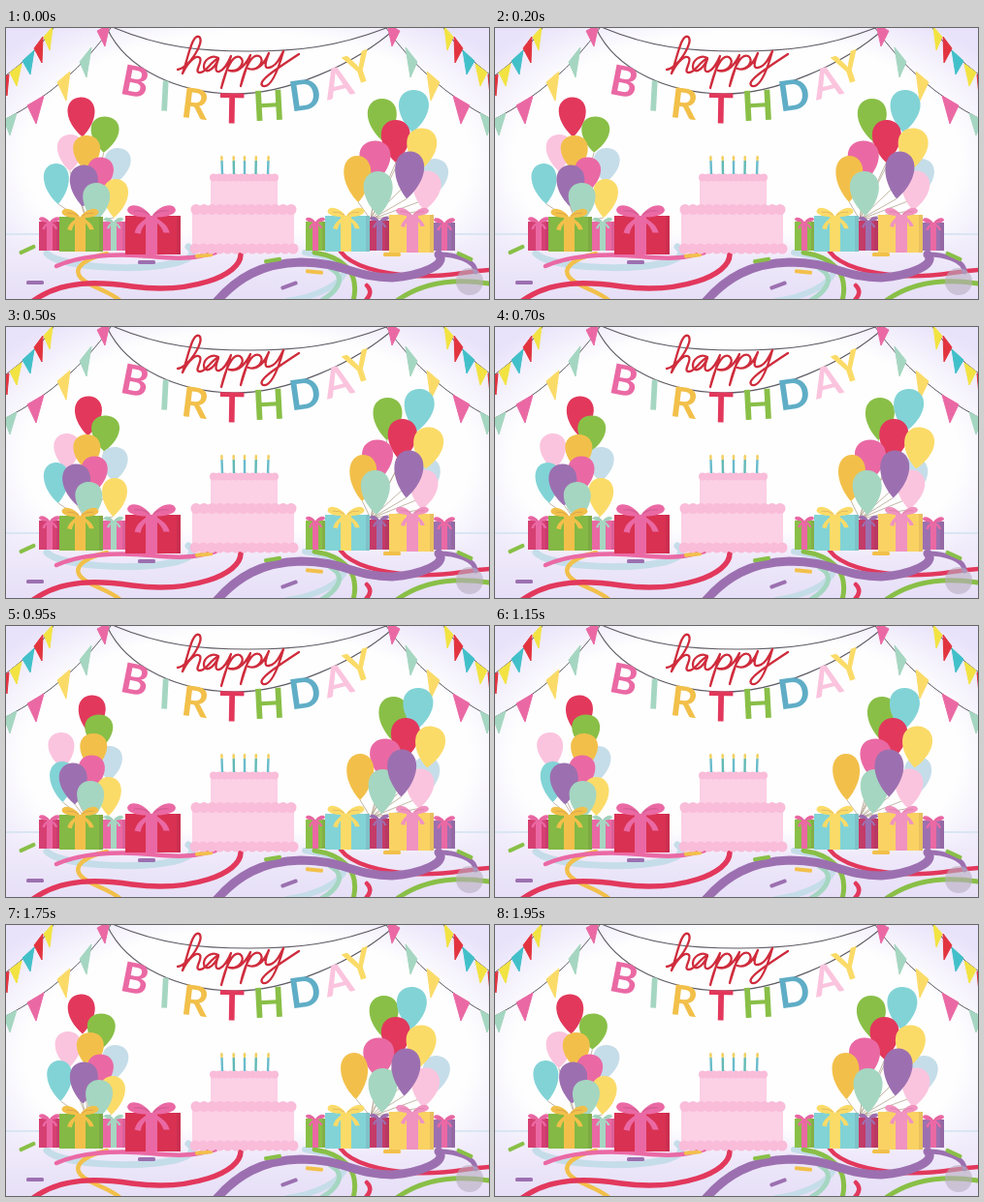
Write an HTML page that moves like this. It is 498 px wide and 280 px high and loops after 2000 ms.

```html
<!DOCTYPE html>
<html lang="en">
<head>
<meta charset="utf-8">
<title>Happy birthday</title>
<style>
  html, body { margin: 0; width: 100%; height: 100%; overflow: hidden; background: #fff; }
  svg { display: block; width: 498px; height: 280px; }
  .line { fill: none; stroke-linecap: round; stroke-linejoin: round; }
  .letters { font: 700 43px Lato, "Open Sans", sans-serif; text-anchor: middle; }
</style>
</head>
<body>
<svg viewBox="0 0 498 280">
  <defs>
    <radialGradient id="wall" cx="50%" cy="48%" r="64%">
      <stop offset=".72" stop-color="#fefefe"/>
      <stop offset="1" stop-color="#e8e2fa"/>
    </radialGradient>
    <linearGradient id="floor" x2="0" y2="1">
      <stop offset="0" stop-color="#f4f1fc" stop-opacity="0"/>
      <stop offset=".4" stop-color="#efe9fa"/>
      <stop offset="1" stop-color="#e6dff7"/>
    </linearGradient>
  </defs>
  <rect width="498" height="280" fill="url(#wall)"/>
  <rect y="208" width="498" height="72" fill="url(#floor)"/>
  <path d="M0,213H34M463,213H498" class="line" stroke="#d9e6f2" stroke-width="2"/>
  <g class="line" stroke="#5d5a63" stroke-width="1.1">
    <path d="M112,0C160,20 200,24 250,24S340,20 392,0"/>
    <path d="M104,0C125,45 180,67 234,68S360,38 402,0"/>
  </g>
  <g id="bunting"></g>
  <g id="bunting2" transform="translate(500) scale(-1 1)"></g>
  <g id="letters" class="letters"></g>
  <path class="line" stroke="#cf2c3c" stroke-width="2.3" aria-label="happy"
    d="M177,43C188,42 206,14 199,9C192,6 188,30 182,47C188,34 197,27 200,31C203,35 193,46 200,46
       C206,46 210,36 219,31C212,27 204,33 204,40C204,47 213,46 219,32C216,40 215,46 220,45
       C225,43 229,36 232,29L222,62C226,45 233,27 241,30C248,34 241,46 230,44
       C240,47 247,38 252,28L242,60C246,42 253,26 261,29C268,33 260,45 250,42
       C260,45 266,37 271,26C267,36 266,42 271,41C278,40 282,32 286,24
       C281,42 274,62 265,60C258,56 276,44 302,27"/>
  <g id="streamers" class="line"></g>
  <g id="confetti"></g>
  <g id="strings" stroke="#b3a48f" stroke-width=".8"></g>
  <g id="balloons"></g>
  <g id="gifts"></g>
  <g id="cake"></g>
  <circle cx="478" cy="262" r="14" fill="#b7aebf" opacity=".6"/>
</svg>
<script>
const C = {
  red: '#e2385c', green: '#89bf47', blush: '#fbc4de', gold: '#f2c04a', sky: '#c5dde9',
  pink: '#ea69a4', lemon: '#fbdb68', cyan: '#82d3d6', purple: '#9c70b0', mint: '#a5d6c1',
  scarlet: '#e2343f', yellow: '#f2e342', teal: '#42c0c9'
};
const put = (id, html) => document.getElementById(id).innerHTML += html;

// Flags: colour, two corners on the cord, tip
const flags = [
  ['scarlet', '-4,52 3,48 1,70'], ['yellow', '4,46 16,37 11,60'], ['teal', '17,34 29,23 25,48'],
  ['scarlet', '29,21 38,9 37,36'], ['yellow', '39,9 48,-1 45,23'],
  ['mint', '-2,95 11,88 4,111'], ['pink', '22,80 39,70 31,99'], ['lemon', '53,56 66,45 62,75'],
  ['mint', '76,35 88,20 83,51'], ['pink', '94,3 107,-4 102,19']
];
const bunting = '<g class="line" stroke="#5d5a63"><path d="M0,49Q30,27 49,0M0,94Q66,60 108,0"/></g>' +
  flags.map(([c, p]) => `<polygon points="${p}" fill="${C[c]}" stroke="${C[c]}"/>`).join('');
put('bunting', bunting);
put('bunting2', bunting);

// Letters: glyph, centre, angle, colour
[['B', 133, 55, 11, 'pink'], ['I', 164, 70, 3, 'mint'], ['R', 195, 78, 7, 'gold'],
 ['T', 233, 83, 1, 'red'], ['H', 271, 80, -3, 'green'], ['D', 308, 69, -8, '#5fadc6'],
 ['A', 342, 56, -14, 'blush'], ['Y', 364, 41, -18, 'lemon']
].forEach(([ch, x, y, a, c]) => put('letters',
  `<text transform="translate(${x} ${y}) rotate(${a})" y="15.5" fill="${C[c] || c}">${ch}</text>`));

// Floor streamers: colour, width, path
[['sky', 7, 'M42,233C56,247 130,252 174,243C192,239 196,232 188,226'],
 ['gold', 4.5, 'M104,233C82,238 68,248 77,258C86,268 106,271 118,282'],
 ['pink', 4.5, 'M52,246C74,236 110,232 150,236S200,236 216,232'],
 ['red', 5.5, 'M28,282C58,260 96,262 130,267C190,275 242,256 242,234'],
 ['sky', 6, 'M290,282C318,278 346,266 350,250C350,240 330,236 308,232'],
 ['green', 5, 'M318,232C344,236 366,250 358,282'],
 ['mint', 5, 'M325,282C345,270 350,256 334,248'],
 ['red', 4.5, 'M345,231C356,246 386,254 420,256S470,252 498,250'],
 ['green', 5, 'M404,281C428,264 460,258 498,264'],
 ['purple', 9, 'M216,284C238,258 264,243 304,242C348,242 360,258 398,258C428,256 456,244 446,234'],
 ['purple', 5, 'M446,234C464,234 484,240 484,252'],
 ['red', 4.5, 'M368,284C378,276 376,270 372,266']
].forEach(([c, w, d]) => put('streamers', `<path d="${d}" stroke="${C[c]}" stroke-width="${w}"/>`));

[[22, 229, -25, 'green'], [30, 263, 0, 'purple'], [145, 242, 0, 'purple'], [204, 235, -5, 'gold'],
 [275, 240, -10, 'green'], [318, 252, 5, 'gold'], [398, 234, 0, 'gold'], [473, 236, 25, 'green'],
 [292, 266, -20, 'purple']
].forEach(([x, y, a, c]) => put('confetti',
  `<rect x="-9" y="-2" width="18" height="4" rx="1.5" fill="${C[c]}" transform="translate(${x} ${y}) rotate(${a})"/>`));

// Balloons, back to front: colour, mean x, y, width, height, sway, time of rightmost point
const PERIOD = 2000, STEP = 50;
const bunches = [
  { hub: [84, 202], list: [
    ['red', 83, 92, 28, 41, 5.5, 890], ['green', 98.5, 110, 29, 37, 5, 270],
    ['blush', 61.7, 129, 27, 38, 4.7, 80], ['sky', 110.5, 142, 27, 36, 4.5, 100],
    ['gold', 87, 130, 28, 38, 5, 1240], ['pink', 93, 152, 27, 37, 4.5, 1880],
    ['lemon', 109, 176, 26, 40, 4.5, 200], ['cyan', 55.5, 161, 26, 42, 4.5, 1250],
    ['purple', 75, 163, 29, 43, 5.5, 1870], ['mint', 90.5, 180, 28, 40, 5.5, 1650]] },
  { hub: [376, 198], list: [
    ['green', 393.5, 95, 30, 44, 5.5, 1010], ['cyan', 422, 86, 31, 44, 4, 650],
    ['sky', 437.5, 155, 28, 40, 5.5, 1750], ['red', 406.5, 117, 30, 44, 5, 880],
    ['lemon', 432.5, 125, 31, 43, 4.7, 820], ['blush', 430, 168, 29, 41, 3.5, 50],
    ['pink', 386, 138, 32, 43, 6, 1160], ['gold', 363.5, 156, 28, 48, 4.7, 570],
    ['mint', 386.5, 171, 30, 46, 6, 1350], ['purple', 411.5, 152, 30, 49, 5.2, 220]] }
];
const shape = 'M0,.5C-.14,.42 -.5,.15 -.5,-.15C-.5,-.37 -.28,-.5 0,-.5S.5,-.37 .5,-.15C.5,.15 .14,.42 0,.5Z';
const balloons = bunches.flatMap(({ hub, list }) => list.map(([c, x, y, w, h, sway, peak]) => {
  put('strings', `<line x2="${hub[0]}" y2="${hub[1]}"/>`);
  put('balloons', `<g><path d="${shape}" fill="${C[c]}" transform="scale(${w} ${h})"/></g>`);
  return { x, y, h, sway, peak, lean: (x - hub[0]) * .08 };
}));
const bodies = document.getElementById('balloons').children;
const strings = document.getElementById('strings').children;

// Gifts: x, y, w, h, box, ribbon, ribbon x, ribbon width, bow size
const bow = `M0,1C-5,-8 -18,-12 -20,-5C-20,0 -8,2 0,1C5,-8 18,-12 20,-5C20,0 8,2 0,1Z
  M0,0C7,3 13,7 15,14L10,14C8,8 4,5 0,3C-4,5 -8,9 -9,15L-14,14C-12,7 -7,3 0,0Z`;
[[34, 200, 22, 30, '#d63f72', 'pink', 42, 6, .55],
 [100, 200, 24, 30, 'pink', 'mint', 108, 6, .5],
 [55, 195, 45, 36, '#83b944', 'gold', 71, 11, .95],
 [123, 194, 57, 40, '#d93152', 'pink', 144, 12, 1.25],
 [309, 200, 21, 30, 'green', 'pink', 316, 6, .5],
 [375, 199, 20, 31, '#c43b68', 'purple', 382, 6, .5],
 [441, 201, 22, 29, 'purple', 'pink', 449, 6, .55],
 [329, 194, 46, 37, 'cyan', 'lemon', 345, 11, .95],
 [395, 193, 46, 39, '#f9d263', '#f093c0', 413, 12, .85]
].forEach(([x, y, w, h, box, rib, rx, rw, s]) => {
  const b = C[box] || box, r = C[rib] || rib;
  put('gifts', `<rect x="${x}" y="${y}" width="${w}" height="${h}" fill="${b}"/>
    <rect x="${x + w - 4}" y="${y}" width="4" height="${h}" fill="#502040" opacity=".1"/>
    <rect x="${rx}" y="${y}" width="${rw}" height="${h}" fill="${r}"/>
    <g transform="translate(${rx + rw / 2} ${y}) scale(${s})">
      <path d="${bow}" fill="${r}"/>
      <path d="M-14,-4Q-7,-5 -2,-1M14,-4Q7,-5 2,-1" class="line" stroke="#803050" opacity=".2"/>
    </g>`);
});

// Cake
const tier = (x, y, w, h) => `<rect x="${x}" y="${y}" width="${w}" height="${h}" rx="4" fill="#fcd0e5"/>`;
const icing = (x, y, w, r) => {
  const n = Math.round(w / (r * 1.5));
  return Array.from({ length: n + 1 }, (_, i) =>
    `<circle cx="${x + w * i / n}" cy="${y}" r="${r}" fill="#f9bcd9"/>`).join('');
};
put('cake', tier(192, 184, 105, 48) + tier(211, 152, 69, 34) +
  icing(196, 187.5, 98, 5.5) + icing(195, 228, 101, 5.5) + icing(214, 154.5, 63, 4));
[223, 235, 246, 257.5, 270].forEach((x, i) => put('cake',
  `<g transform="rotate(${i - 2} ${x} 151)">
     <rect x="${x - 1.2}" y="137" width="2.4" height="14" fill="${i % 2 ? '#62b9b4' : '#6abccb'}"/>
     <ellipse cx="${x}" cy="134.5" rx="1.4" ry="2.8" fill="#f2cf62"/>
   </g>`));

function draw(now) {
  const t = Math.floor(now % PERIOD / STEP) * STEP;
  balloons.forEach((b, i) => {
    const dx = b.sway * Math.cos(2 * Math.PI * (t - b.peak) / PERIOD);
    const tilt = b.lean + dx * .6, rad = tilt * Math.PI / 180;
    bodies[i].setAttribute('transform', `translate(${b.x + dx} ${b.y}) rotate(${tilt})`);
    strings[i].setAttribute('x1', b.x + dx - Math.sin(rad) * b.h / 2);
    strings[i].setAttribute('y1', b.y + Math.cos(rad) * b.h / 2);
  });
}
const start = performance.now();
function loop(now) {
  draw(Math.max(0, now - start));
  requestAnimationFrame(loop);
}
draw(0);
requestAnimationFrame(loop);
</script>
</body>
</html>
```
